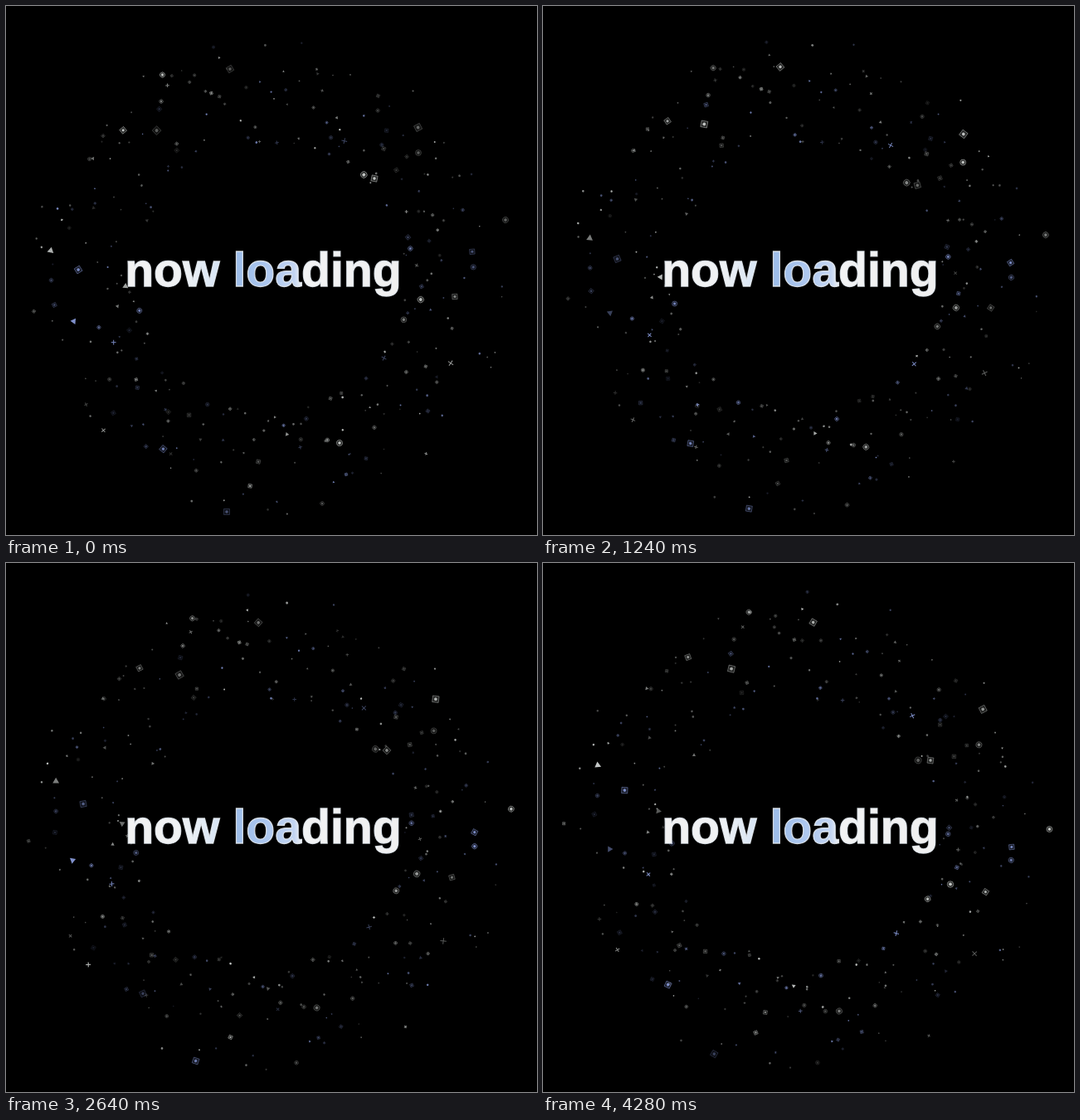
Write an HTML page that moves like this. It is 640 px wide and 638 px high and loops after 4320 ms.

```html
<!DOCTYPE html>
<html lang="en">
<head>
<meta charset="utf-8">
<title>now loading</title>
<style>
  html, body { margin: 0; width: 100%; height: 100%; overflow: hidden; background: #000; }
  svg { display: block; width: 100vw; height: 100vh; }
  text { font: bold 57.2px "Liberation Sans", Arial, sans-serif; }
</style>
</head>
<body>
<svg viewBox="0 0 640 638">
  <defs>
    <linearGradient id="ink" gradientUnits="userSpaceOnUse" x1="146" y1="0" x2="476" y2="0">
      <stop offset="0" stop-color="#f2f2f2"/>
      <stop offset=".2" stop-color="#f0f2f4"/>
      <stop offset=".33" stop-color="#d9e6f5"/>
      <stop offset=".4" stop-color="#9dbde9"/>
      <stop offset=".5" stop-color="#aac5ee"/>
      <stop offset=".61" stop-color="#c3d5f2"/>
      <stop offset=".64" stop-color="#f2f3f4"/>
      <stop offset="1" stop-color="#f0f0f0"/>
    </linearGradient>
  </defs>
  <rect width="640" height="638"/>
  <g id="sparks"></g>
  <text x="143.2" y="338.4" fill="url(#ink)" stroke="#e9eff4" stroke-opacity=".85" stroke-width="1.3">now loading</text>
</svg>
<script>
const LOOP = 4320, STEP = 40, TAU = Math.PI * 2;
const CX = 318, CY = 328, INNER = 162, OUTER = 288;
const COUNT = 290;
const layer = document.getElementById('sparks');

let seed = 20117;
const rand = () => {
  seed = (seed * 1664525 + 1013904223) >>> 0;
  return seed / 4294967296;
};
const between = (a, b) => a + (b - a) * rand();
const pick = list => list[Math.floor(rand() * list.length)];

const framed = (outline, r, c) =>
  `<g fill="${c}" fill-opacity=".2" stroke="${c}" stroke-opacity=".7" stroke-width=".7">${outline}</g><circle r="${r * .5}" fill="${c}"/>`;

const draw = {
  dot: (r, c) => `<circle r="${r * .6}" fill="${c}"/>`,
  ring: (r, c) => framed(`<circle r="${r}"/>`, r, c),
  square: (r, c) => framed(`<path d="M${-r} ${-r}H${r}V${r}H${-r}z"/>`, r, c),
  triangle: (r, c) => `<path d="M0 ${-r}L${r} ${r * .75}H${-r}z" fill="${c}"/>`,
  plus: (r, c) => `<path d="M${-r} 0H${r}M0 ${-r}V${r}" stroke="${c}"/>`
};
const mix = ['dot', 'dot', 'dot', 'dot', 'dot', 'dot', 'ring', 'ring', 'square', 'square', 'triangle', 'plus'];

function addSpark(kind, size, light, r, a, turn, drift) {
  const node = document.createElementNS('http://www.w3.org/2000/svg', 'g');
  const tint = rand() < .33 ? '#96aaf0' : '#e6eae8';
  node.innerHTML = draw[kind](+size.toFixed(2), tint);
  layer.append(node);
  return {
    node, light, r, a, turn, drift,
    tilt: between(0, 360), spin: between(-35, 35),
    phase: between(0, TAU), pulse: between(1.5, 5)
  };
}

// Evenly spread around the ring, thinning out towards the rim.
const sparks = Array.from({ length: COUNT }, (_, i) => {
  const kind = pick(mix);
  const big = kind !== 'dot' && rand() < .16;
  const size = big ? between(2.8, 3.9) : between(1.2, 2.4);
  const light = big ? .85 : between(.35, .85);
  const r = INNER + (OUTER - INNER) * rand() ** 1.35;
  const a = (i + rand()) / COUNT * TAU;
  return addSpark(kind, size, light, r, a, between(.14, .25), between(-8, 8));
});

// A few conspicuous sparks at known starting points.
for (const [kind, x, y] of [
  ['ring', 402, 527], ['square', 444, 208], ['ring', 497, 177],
  ['square', 270, 76], ['ring', 602, 258], ['square', 266, 610]
]) {
  sparks.push(addSpark(kind, 3.5, .85, Math.hypot(x - CX, y - CY), Math.atan2(y - CY, x - CX), .22, 0));
}

function render(time) {
  const t = Math.floor((time % LOOP) / STEP) * STEP;
  const k = t / LOOP, sec = t / 1000;
  for (const s of sparks) {
    const r = s.r + s.drift * k, a = s.a + s.turn * k;
    const x = CX + r * Math.cos(a), y = CY + r * Math.sin(a);
    const glow = s.light * (.72 + .28 * Math.sin(s.phase + s.pulse * sec));
    s.node.setAttribute('transform',
      `translate(${x.toFixed(2)} ${y.toFixed(2)}) rotate(${(s.tilt + s.spin * sec).toFixed(1)})`);
    s.node.setAttribute('opacity', glow.toFixed(3));
  }
}

const start = performance.now();
function tick() {
  render(performance.now() - start);
  requestAnimationFrame(tick);
}
tick();
</script>
</body>
</html>
```
